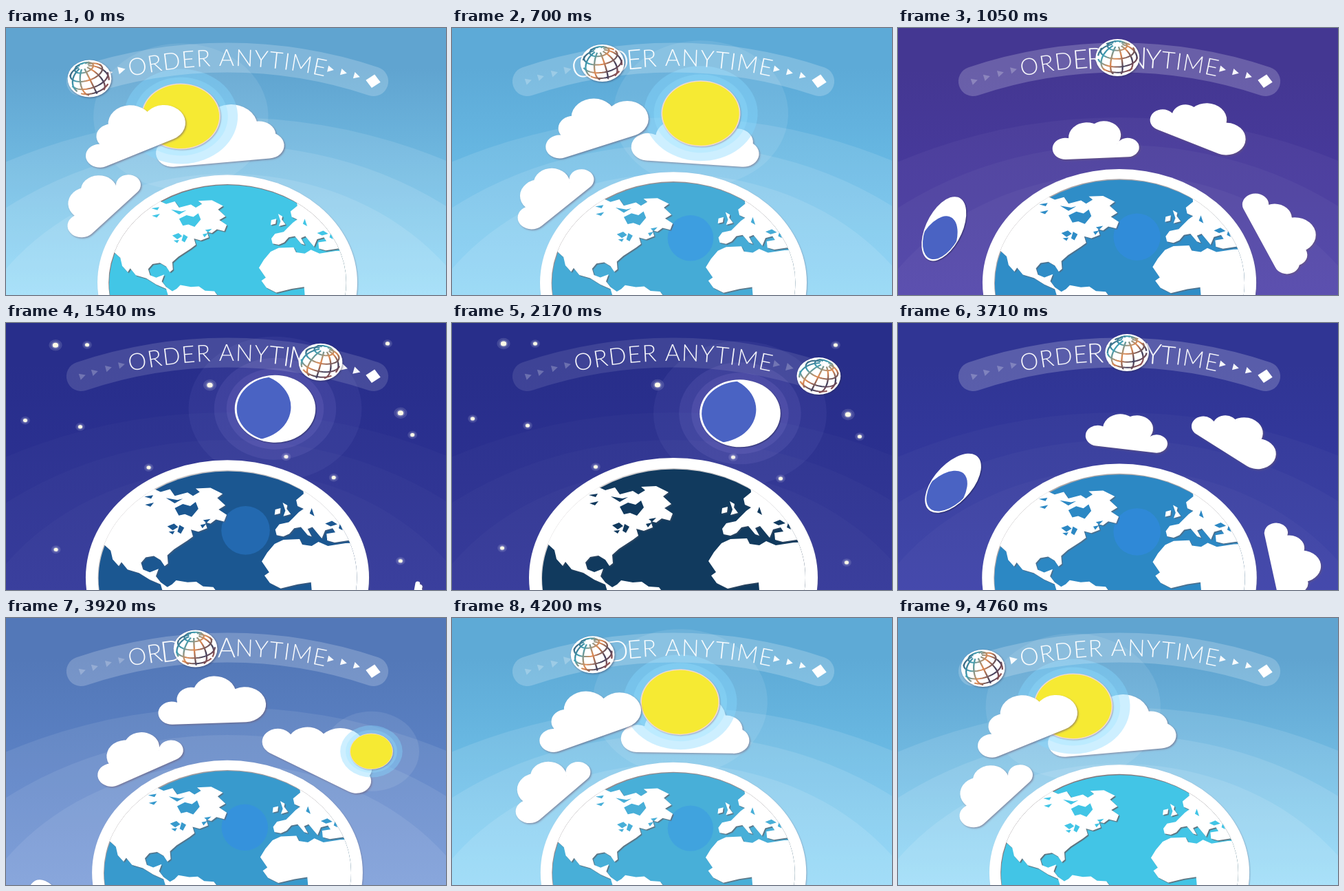
These frames come from a looping animation (640x388 px, 4830 ms). An HTML page with a canvas:

```html
<!DOCTYPE html>
<html lang="en">
<head>
<meta charset="utf-8">
<title>Order anytime</title>
<style>
html, body { margin: 0; width: 100%; height: 100%; overflow: hidden; background: #2a3088; }
canvas { display: block; width: 640px; height: 388px; }
</style>
</head>
<body>
<canvas id="stage" width="640" height="388"></canvas>
<script>
const ctx = document.getElementById('stage').getContext('2d');
const LOOP = 4830, TAU = Math.PI * 2, RAD = Math.PI / 180;
const STRETCH = 1.2;                  // the scene is wider than it is tall
const EARTH = { x: 322, y: 370 };
const ARC = { x: 322, y: 715, r: 672 };
const TURN = 160;                     // degrees the sky turns from day to night

const clamp = v => Math.max(0, Math.min(1, v));
const lerp = (a, b, k) => a + (b - a) * k;
const smooth = (a, b, v) => { const k = clamp((v - a) / (b - a)); return k * k * (3 - 2 * k); };
const wave = k => (1 - Math.cos(Math.PI * clamp(k))) / 2;
const white = a => `rgba(255,255,255,${a})`;

function slide(t) {
  return t < 2300 ? wave(t / 2155) : 1 - wave(Math.pow((t - 2300) / 2560, 1.19));
}

function swing(v) {
  const k = clamp(v);
  return k < 0.5 ? 0.5 * Math.pow(2 * k, 2.75) : 1 - 0.5 * Math.pow(2 - 2 * k, 2.75);
}

function mix(stops, k) {
  let i = 1;
  while (i < stops.length - 1 && k > stops[i][0]) i++;
  const [a, from] = stops[i - 1], [b, to] = stops[i];
  const f = clamp((k - a) / (b - a));
  return `rgb(${from.map((c, n) => Math.round(lerp(c, to[n], f))).join()})`;
}

const SKY_TOP = [[0, [96, 164, 208]], [0.06, [93, 172, 216]], [0.43, [72, 56, 146]], [0.56, [42, 52, 148]], [1, [40, 46, 138]]];
const SKY_LOW = [[0, [132, 212, 246]], [0.06, [118, 205, 244]], [0.43, [78, 60, 166]], [0.56, [48, 60, 166]], [1, [46, 50, 150]]];
const OCEAN = [[0, [66, 198, 230]], [0.2, [72, 176, 216]], [0.5, [45, 138, 198]], [0.83, [26, 84, 142]], [1, [17, 58, 94]]];

function disc(x, y, r, fill, ry = r) {
  ctx.beginPath();
  ctx.ellipse(x, y, r, ry, 0, 0, TAU);
  ctx.fillStyle = fill;
  ctx.fill();
}

function shadow(color, offset, blur) {
  ctx.shadowColor = color;
  ctx.shadowOffsetX = ctx.shadowOffsetY = offset;
  ctx.shadowBlur = blur;
}

function scoped(draw) {
  ctx.save();
  draw();
  ctx.restore();
}

// Draws in a frame standing on the circle around the earth, angle 0 being straight up.
function inOrbit(angle, radius, draw) {
  scoped(() => {
    ctx.translate(EARTH.x, EARTH.y);
    ctx.scale(STRETCH, 1);
    ctx.rotate(angle * RAD);
    ctx.translate(0, -radius);
    draw();
  });
}

function drawSky(e) {
  const sky = ctx.createLinearGradient(0, 60, 0, 388);
  sky.addColorStop(0, mix(SKY_TOP, e));
  sky.addColorStop(1, mix(SKY_LOW, e));
  ctx.fillStyle = sky;
  ctx.fillRect(0, 0, 640, 388);
  const day = 1 - smooth(0, 0.6, e);
  for (const [top, r] of [[130, 590], [170, 440], [212, 330]]) {
    disc(EARTH.x, top + r, r * STRETCH, white(0.02 + 0.09 * day), r);
  }
}

const STARS = [
  [75, 30, 4.2], [121, 30, 3], [558, 32, 3], [299, 90, 4.2], [30, 139, 3], [110, 149, 3], [576, 133, 4.2],
  [593, 165, 3], [209, 209, 3], [409, 195, 3], [478, 226, 3], [73, 327, 3], [574, 348, 3]
];

function drawStars(e) {
  scoped(() => {
    ctx.globalAlpha = smooth(0.62, 0.94, e);
    ctx.translate(EARTH.x, EARTH.y);
    ctx.rotate(-15 * (1 - e) * RAD);
    ctx.translate(-EARTH.x, -EARTH.y);
    for (const [x, y, r] of STARS) {
      disc(x, y, r * 2.3, white(0.13), r * 1.95);
      disc(x, y, r * 1.5, white(0.2), r * 1.3);
      disc(x, y, r, '#fffbe8', r * 0.85);
    }
  });
}

// Each cloud: start angle, radius, radius growth, lag behind the sky, own tilt, lobes [x, y, r].
const CLOUDS = {
  wide: { angle: -2.5, radius: 210, grow: 0, lag: 0, tilt: -2,
    lobes: [[-59, 17, 20], [58, 15, 19], [15, -16, 32], [48, -1, 20], [-25, 0, 26]] },
  left: { angle: -27.5, radius: 242, grow: 6, lag: 0.055, tilt: 1,
    lobes: [[-52, 8, 17], [39, 0, 26], [2, -17, 27], [-27, -11, 18]] },
  low: { angle: -52.6, radius: 197, grow: 38, lag: 0.075, tilt: 5,
    lobes: [[-41, 10, 17], [41, 12, 15], [-12, -6, 24], [11, -9, 22]] }
};

function drawCloud({ angle, radius, grow, lag, tilt, lobes }, p) {
  const e = swing(p - lag), size = 1 - e * e;
  if (size < 0.05) return;
  inOrbit(angle + TURN * e, radius + grow * e, () => {
    ctx.rotate(tilt * RAD);
    ctx.scale(size, size);
    const path = new Path2D();
    for (const [x, y, r] of lobes) {
      path.moveTo(x + r, y);
      path.arc(x, y, r, 0, TAU);
    }
    const [[ax, ay, ar], [bx, by, br]] = lobes;
    path.moveTo(ax, ay - ar * 0.4);
    path.lineTo(bx, by - br * 0.4);
    path.lineTo(bx, by + br);
    path.lineTo(ax, ay + ar);
    path.closePath();
    shadow('rgba(105,85,110,0.55)', 1.5, 2.5);
    ctx.fillStyle = '#fff';
    ctx.fill(path);
  });
}

function drawSun(p) {
  const e = swing(p + 0.07), size = 1 - smooth(0.2, 0.55, e);
  if (size <= 0) return;
  inOrbit(-13.5 + TURN * e, 248, () => {
    ctx.scale(size, size);
    disc(0, 0, 106, white(0.09));
    disc(0, 0, 69, 'rgba(130,215,255,0.4)');
    disc(0, 0, 57, 'rgba(150,225,255,0.3)');
    shadow('rgba(110,90,120,0.45)', 1, 2);
    disc(0, 0, 48, '#f0d9d0');
    shadow('transparent', 0, 0);
    disc(0, 0, 46.5, '#f6ea33');
  });
}

function drawMoon(p) {
  const e = swing(p), open = smooth(0.45, 0.93, e), glow = smooth(0.6, 0.95, e);
  inOrbit(18.7 - TURN * (1 - e), lerp(225, 252, smooth(0.42, 0.6, e)), () => {
    ctx.rotate(-8 * RAD * open);
    for (const [r, a] of [[105, 0.06], [74, 0.09], [59, 0.1]]) {
      disc(0, 0, r * glow, `rgba(190,180,255,${a * glow})`);
    }
    ctx.scale(1, lerp(0.46, 1, open));
    shadow('rgba(20,20,50,0.5)', 1, 2);
    disc(0, 0, 49, '#fff');
    shadow('transparent', 0, 0);
    ctx.beginPath();
    ctx.arc(0, 0, 46.5, 0, TAU);
    ctx.clip();
    disc(-29, 0, 48, '#4a63c3');
  });
}

const LAND = [
  // the Americas
  'M100 300L137 320 148 330 151 343 160 353 164 347 173 358 190 363 206 373 222 380 228 400H312L300 384 285 383 275 376 262 377 245 374 239 380 232 384 222 377 215 368 219 357 206 362 196 358 193 348 200 340 212 338 222 344 228 353 233 349 232 337 242 328 262 315 270 309 267 299 278 302 291 297 288 288 296 290 304 284 316 287 320 277 308 269 318 263 306 252 314 246 296 237 274 238 280 243 270 249 262 244 243 249 236 239 222 243 211 238 200 246 180 235Z',
  // Europe
  'M432 225L434 246 423 255 425 264 434 268 427 273 418 282 412 288 398 291 392 299 394 307 404 309 413 305 420 297 430 295 440 307 446 309 440 298 447 295 456 306 461 312 466 300 477 297 481 303 468 305 469 315 480 318 500 315 540 330 520 230Z',
  // Africa
  'M540 318L496 319 470 323 456 317 446 323 432 321 428 313 404 314 391 320 380 333 372 346 383 362 376 367 384 378 400 386 425 380 445 377 447 400H540Z',
  // British Isles
  'M403 259L410 263 409 268 415 276 404 279 407 271Z',
  'M392 269L400 267 399 275 391 277Z'
].map(d => new Path2D(d));

const WATERS = new Path2D(
  'M243 267L255 261 266 264 274 258 278 268 268 280 258 276 249 278Z' +
  'M232 294L242 290 248 295 240 300ZM250 292L257 296 252 305 247 302ZM234 302L243 301 240 306Z' +
  'M198 250L211 248 208 253ZM199 262L212 259 207 265ZM230 252L247 255 255 253 243 260ZM285 285L296 283 290 289Z' +
  'M281 292L290 290 284 297ZM466 290L476 286 484 291 474 294ZM488 290L492 300 486 297ZM446 267L450 279 443 275Z'
);

function drawEarth(p) {
  scoped(() => {
    const size = lerp(0.9, 1, p), sea = mix(OCEAN, p), edge = `rgba(100,90,95,${lerp(0.8, 0.3, p)})`;
    ctx.translate(EARTH.x, EARTH.y);
    ctx.scale(size, size);
    ctx.translate(-321, -EARTH.y);
    shadow('rgba(90,90,120,0.4)', 1, 2);
    disc(321, 370, 210, '#fff', 174);
    shadow('transparent', 0, 0);
    disc(321, 370, 192, edge, 159);
    ctx.beginPath();
    ctx.ellipse(321, 370, 192, 159, 0, 0, TAU);
    ctx.clip();
    disc(322, 371.5, 192, sea, 159);
    disc(348, 300, 36, `rgba(50,140,235,${0.5 * smooth(0.05, 0.3, p) * (1 - smooth(0.7, 1, p))})`, 36);
    shadow(edge, 1.5, 1);
    ctx.fillStyle = '#fff';
    for (const path of LAND) ctx.fill(path);
    shadow('transparent', 0, 0);
    ctx.fillStyle = sea;
    ctx.fill(WATERS);
  });
}

const arcPoint = a => [ARC.x + ARC.r * Math.sin(a), ARC.y - ARC.r * Math.cos(a)];

// Items on the banner swell when the knob is near.
function onBanner(a, knob, draw) {
  scoped(() => {
    ctx.translate(...arcPoint(a));
    ctx.rotate(a);
    const swell = 1 + 0.45 * Math.max(0, 1 - Math.abs(a - knob) * ARC.r / 75);
    ctx.scale(swell, swell);
    draw();
  });
}

function drawBanner(p, e) {
  const knob = lerp(-0.303, 0.32, p);
  ctx.beginPath();
  ctx.arc(ARC.x, ARC.y, ARC.r, -Math.PI / 2 - 0.322, -Math.PI / 2 + 0.322);
  ctx.lineWidth = 43;
  ctx.lineCap = 'round';
  ctx.strokeStyle = white(lerp(0.2, 0.1, smooth(0.5, 1, p)));
  ctx.stroke();

  for (const x of [111, 129, 149, 168, 472, 491, 510]) {
    const a = Math.asin((x - ARC.x) / ARC.r);
    onBanner(a, knob, () => {
      ctx.fillStyle = white(a > knob ? 0.95 : 0.24);
      ctx.fill(new Path2D('M-4 -4.8L5 0 -4 4.8Z'));
    });
  }
  onBanner(0.321, knob, () => {
    ctx.rotate(0.2);
    ctx.fillStyle = '#fff';
    ctx.fill(new Path2D('M-3 -9.5L10 -4 3 9.5 -10 4Z'));
  });

  const text = 'ORDER ANYTIME', gap = 1.7;
  ctx.font = '300 34px Lato, "Open Sans", sans-serif';
  ctx.textAlign = 'center';
  ctx.textBaseline = 'alphabetic';
  const widths = [...text].map(c => ctx.measureText(c).width + gap);
  let at = -(widths.reduce((sum, w) => sum + w) - gap) / 2;
  [...text].forEach((c, i) => {
    onBanner((at + (widths[i] - gap) / 2) / ARC.r, knob, () => {
      ctx.fillStyle = white(0.95);
      ctx.fillText(c, 0, 12);
    });
    at += widths[i];
  });
  drawKnob(knob, p);
}

function drawKnob(a, p) {
  scoped(() => {
    ctx.translate(...arcPoint(a));
    ctx.scale(1.18, 1);
    shadow('rgba(40,40,70,0.5)', 1, 3);
    disc(0, 0, 27, '#fff');
    shadow('transparent', 0, 0);
    ctx.rotate((p - 0.5) * 0.8);
    const ink = ctx.createLinearGradient(-22, -20, 22, 20);
    ['#3b4a6a', '#3f9fb4', '#e08a52', '#40405e', '#c8604c'].forEach((c, i) => ink.addColorStop(i / 4, c));
    ctx.strokeStyle = ink;
    ctx.lineWidth = 2;
    ctx.lineCap = 'butt';
    for (const lat of [-30, 0, 30, 60]) curve(k => [lat * RAD, k * TAU]);
    for (let i = 0; i < 10; i++) {
      const lon = i * TAU / 10 + p * Math.PI;
      curve(k => [lerp(-75, 75, k) * RAD, lon]);
    }
  });
}

// Strokes the front part of a line on a globe whose pole leans toward the viewer.
function curve(place) {
  const r = 24, lean = 0.6;
  let pen = false;
  ctx.beginPath();
  for (let i = 0; i <= 48; i++) {
    const [lat, lon] = place(i / 48);
    const x = Math.cos(lat) * Math.sin(lon), y = Math.sin(lat), z = Math.cos(lat) * Math.cos(lon);
    const front = z * Math.cos(lean) + y * Math.sin(lean) > 0;
    const px = r * x, py = r * (z * Math.sin(lean) - y * Math.cos(lean));
    if (front) pen ? ctx.lineTo(px, py) : ctx.moveTo(px, py);
    pen = front;
  }
  ctx.stroke();
}

function render(now) {
  const p = slide(now % LOOP), e = swing(p);
  drawSky(e);
  drawStars(e);
  drawMoon(p);
  drawCloud(CLOUDS.wide, p);
  drawSun(p);
  drawCloud(CLOUDS.left, p);
  drawCloud(CLOUDS.low, p);
  drawEarth(p);
  drawBanner(p, e);
}

let start = null;
function tick(now) {
  if (start === null) start = now;
  render(now - start);
  requestAnimationFrame(tick);
}
render(0);
requestAnimationFrame(tick);
</script>
</body>
</html>
```
